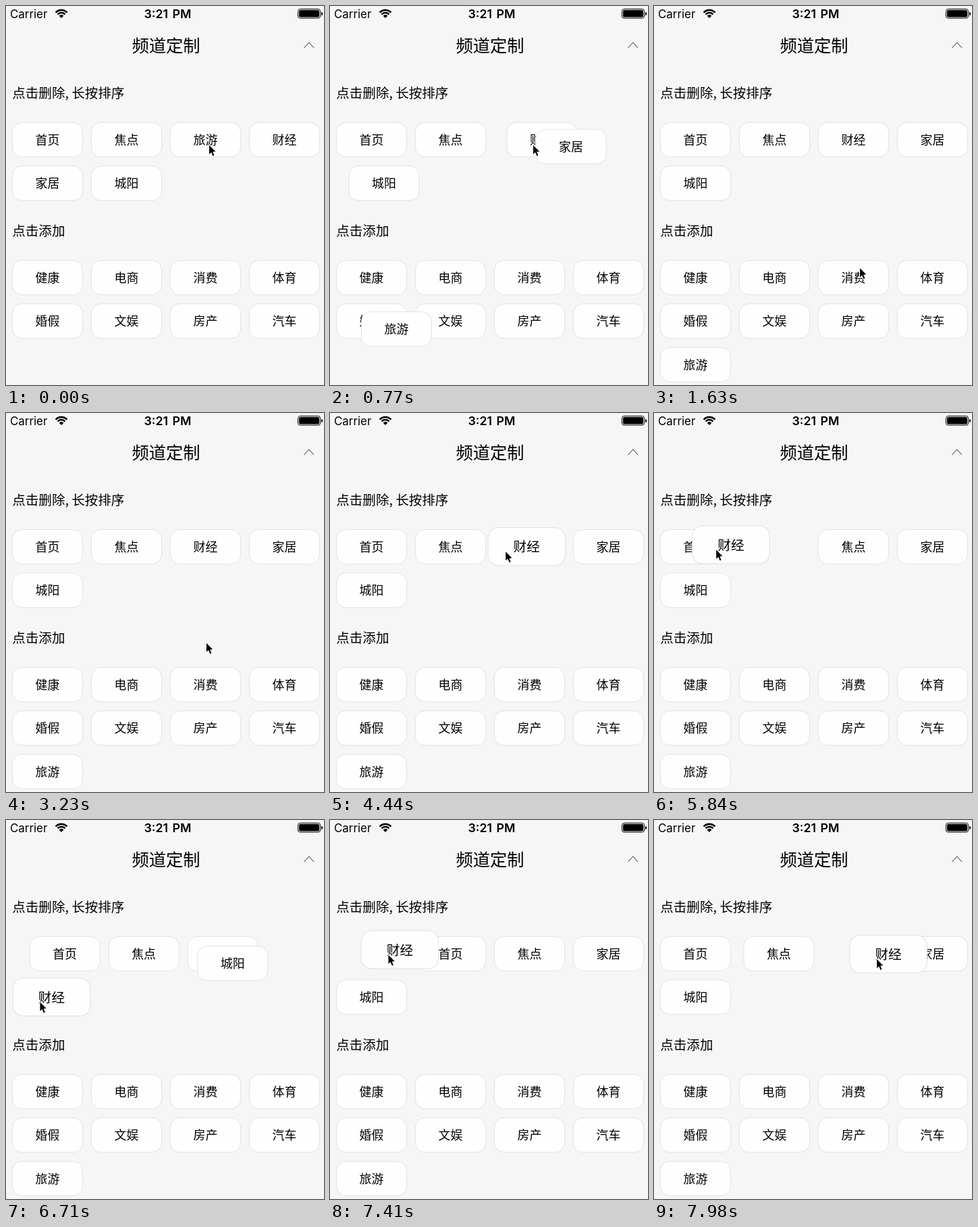
These frames come from a looping animation (471x561 px, 8000 ms). An HTML page with a canvas:

```html
<!DOCTYPE html>
<html lang="zh-CN">
<head>
<meta charset="utf-8">
<style>
html, body { margin: 0; width: 100%; height: 100%; overflow: hidden; background: #f6f6f6; }
canvas { display: block; width: 471px; height: 561px; }
</style>
</head>
<body>
<canvas id="stage"></canvas>
<script>
const W = 471, H = 561, LOOP = 8000;
const CJK = '"Noto Sans CJK SC", "Noto Sans CJK", sans-serif';
const LATIN = 'Inter, "Liberation Sans", sans-serif';
const canvas = document.getElementById('stage');
const dpr = window.devicePixelRatio || 1;
canvas.width = W * dpr;
canvas.height = H * dpr;
const ctx = canvas.getContext('2d');

const REMOVED = '旅游', DRAGGED = '财经';
const start = ['首页', '焦点', REMOVED, DRAGGED, '家居', '城阳'];
const extras = ['健康', '电商', '消费', '体育', '婚假', '文娱', '房产', '汽车'];
const REMOVE_AT = 590, PICK_AT = 4220, MOVE_MS = 250;
const CARD_W = 104, CARD_H = 51;

const clamp = u => Math.max(0, Math.min(1, u));
const mix = (a, b, u) => a + (b - a) * u;
const mixPoint = (a, b, u) => [mix(a[0], b[0], u), mix(a[1], b[1], u)];

// cubic-bezier(.42, 0, .58, 1)
function ease(u) {
  u = clamp(u);
  let lo = 0, hi = 1, s = u;
  for (let i = 0; i < 20; i++) {
    s = (lo + hi) / 2;
    const x = 1.26 * s * (1 - s) ** 2 + 1.74 * s * s * (1 - s) + s ** 3;
    if (x < u) lo = s; else hi = s;
  }
  return s * s * (3 - 2 * s);
}
const ramp = (t, from, to) => ease((t - from) / (to - from));

// hand strokes: each eases to its end point between two times
const stroke = (from, to, x, y) => ({ from, to, end: [x, y] });
const follow = (origin, strokes, t) =>
  strokes.reduce((p, s) => mixPoint(p, s.end, ramp(t, s.from, s.to)), origin);

const hover = t => follow([301, 206], [
  stroke(1090, 1630, 305, 388),
  stroke(2370, 2930, 297, 343),
  stroke(3190, 3630, 291, 193)
], t);

const drag = t => follow([295.5, 198], [
  stroke(4365, 5020, 136, 187),
  stroke(5260, 5550, 145, 194),
  stroke(5690, 5840, 114, 195),
  stroke(5840, 6460, 69, 230),
  stroke(6460, 6710, 67.5, 262),
  stroke(6710, 7290, 99.7, 192),
  stroke(7340, 8200, 385.4, 199.5)
], t);

// the pointer slips ahead of the card on pick-up, then the card catches up
function pointerAt(t) {
  if (t < PICK_AT) return hover(t);
  const slip = ramp(t, PICK_AT, 4440), catchUp = ramp(t, 4440, 6800);
  const [x, y] = drag(t);
  return [x + mix(mix(-4.5, -31, slip), -17, catchUp), y + mix(-5, 7.5, slip)];
}

// centre of a grid cell
const slot = (i, top) => [61.5 + 117 * (i % 4), top + 64.4 * Math.floor(i / 4)];
const mine = i => slot(i, 198);
const more = i => slot(i, 402);

// reorder whenever the dragged centre enters another cell
const kept = start.filter(n => n !== REMOVED);
const orders = [{ at: 0, list: start }, { at: REMOVE_AT, list: kept }];
for (let at = PICK_AT; at < LOOP; at += 2) {
  const [x, y] = drag(at);
  const over = kept.findIndex((_, i) => {
    const [cx, cy] = mine(i);
    return Math.abs(x - cx) < CARD_W / 2 && Math.abs(y - cy) < CARD_H / 2;
  });
  if (over < 0 || orders.at(-1).list[over] === DRAGGED) continue;
  const list = kept.filter(n => n !== DRAGGED);
  list.splice(over, 0, DRAGGED);
  orders.push({ at, list });
}

function text(str, x, y, size, family, align = 'center', weight = 350) {
  ctx.font = `${weight} ${size}px ${family}`;
  ctx.textAlign = align;
  ctx.fillStyle = '#000';
  ctx.fillText(str, x, y);
}

function box(x, y, w, h, r) {
  ctx.beginPath();
  ctx.roundRect(x, y, w, h, r);
}

function card(name, [x, y], scale = 1) {
  ctx.save();
  ctx.translate(x, y);
  ctx.scale(scale, scale);
  box(-CARD_W / 2, -CARD_H / 2, CARD_W, CARD_H, 14);
  ctx.fillStyle = '#fefefe';
  ctx.fill();
  ctx.lineWidth = 1;
  ctx.strokeStyle = '#e2e2e2';
  ctx.stroke();
  text(name, 0, 7, 17.9, CJK);
  ctx.restore();
}

function statusBar() {
  text('Carrier', 6, 18, 16.9, LATIN, 'left', 400);
  ctx.wordSpacing = '2px';
  text('3:21 PM', 239.5, 18, 17.8, LATIN, 'center', 600);
  ctx.wordSpacing = '0px';

  ctx.strokeStyle = '#000';
  ctx.lineWidth = 2.4;
  const fan = r => ctx.arc(82, 17.6, r, -Math.PI * 0.76, -Math.PI * 0.24);
  for (const r of [11.6, 7.6]) {
    ctx.beginPath();
    fan(r);
    ctx.stroke();
  }
  ctx.beginPath();
  ctx.moveTo(82, 18);
  fan(4.6);
  ctx.fill();

  ctx.lineWidth = 1;
  box(432.5, 4.5, 33, 13.5, 3);
  ctx.stroke();
  box(434, 6, 30, 10.5, 1.8);
  ctx.fill();
  box(467, 9, 2, 5, [0, 2, 2, 0]);
  ctx.fill();
}

function headings() {
  text('频道定制', 237, 67.5, 25.3, CJK);
  text('点击删除, 长按排序', 9.3, 135.5, 19.55, CJK, 'left');
  text('点击添加', 9.3, 339.5, 19.55, CJK, 'left');
  ctx.strokeStyle = '#555';
  ctx.lineWidth = 1.1;
  ctx.beginPath();
  ctx.moveTo(441.5, 62);
  ctx.lineTo(448.8, 54);
  ctx.lineTo(456, 62);
  ctx.stroke();
}

function pointer([x, y]) {
  ctx.save();
  ctx.translate(x, y);
  ctx.beginPath();
  [[0, 0], [0, 13.4], [3, 10.6], [5.4, 16], [7.4, 15.1], [5.2, 9.8], [9.3, 9.6]]
    .forEach(p => ctx.lineTo(...p));
  ctx.closePath();
  ctx.lineJoin = 'round';
  ctx.lineWidth = 2.2;
  ctx.strokeStyle = '#fff';
  ctx.stroke();
  ctx.fillStyle = '#000';
  ctx.fill();
  ctx.restore();
}

function channels(t) {
  const k = orders.findLastIndex(o => o.at <= t);
  const now = orders[k].list, prev = orders[Math.max(0, k - 1)].list;
  const u = ramp(t, orders[k].at, orders[k].at + MOVE_MS);
  const dragging = t >= PICK_AT;

  extras.forEach((name, i) => card(name, more(i)));
  now.forEach((name, i) => {
    if (name === REMOVED || dragging && name === DRAGGED) return;
    card(name, mixPoint(mine(prev.indexOf(name)), mine(i), u));
  });
  const gone = ramp(t, REMOVE_AT, REMOVE_AT + MOVE_MS);
  card(REMOVED, mixPoint(mine(start.indexOf(REMOVED)), more(extras.length), gone));
  if (dragging) card(DRAGGED, drag(t), 1 + 0.1 * ramp(t, PICK_AT - 40, PICK_AT + 80));
}

function draw(t) {
  ctx.setTransform(dpr, 0, 0, dpr, 0, 0);
  ctx.fillStyle = '#f6f6f6';
  ctx.fillRect(0, 0, W, H);
  statusBar();
  headings();
  channels(t);
  pointer(pointerAt(t));
}

const began = performance.now();
function tick() {
  draw((performance.now() - began) % LOOP);
  requestAnimationFrame(tick);
}
tick();
</script>
</body>
</html>
```
